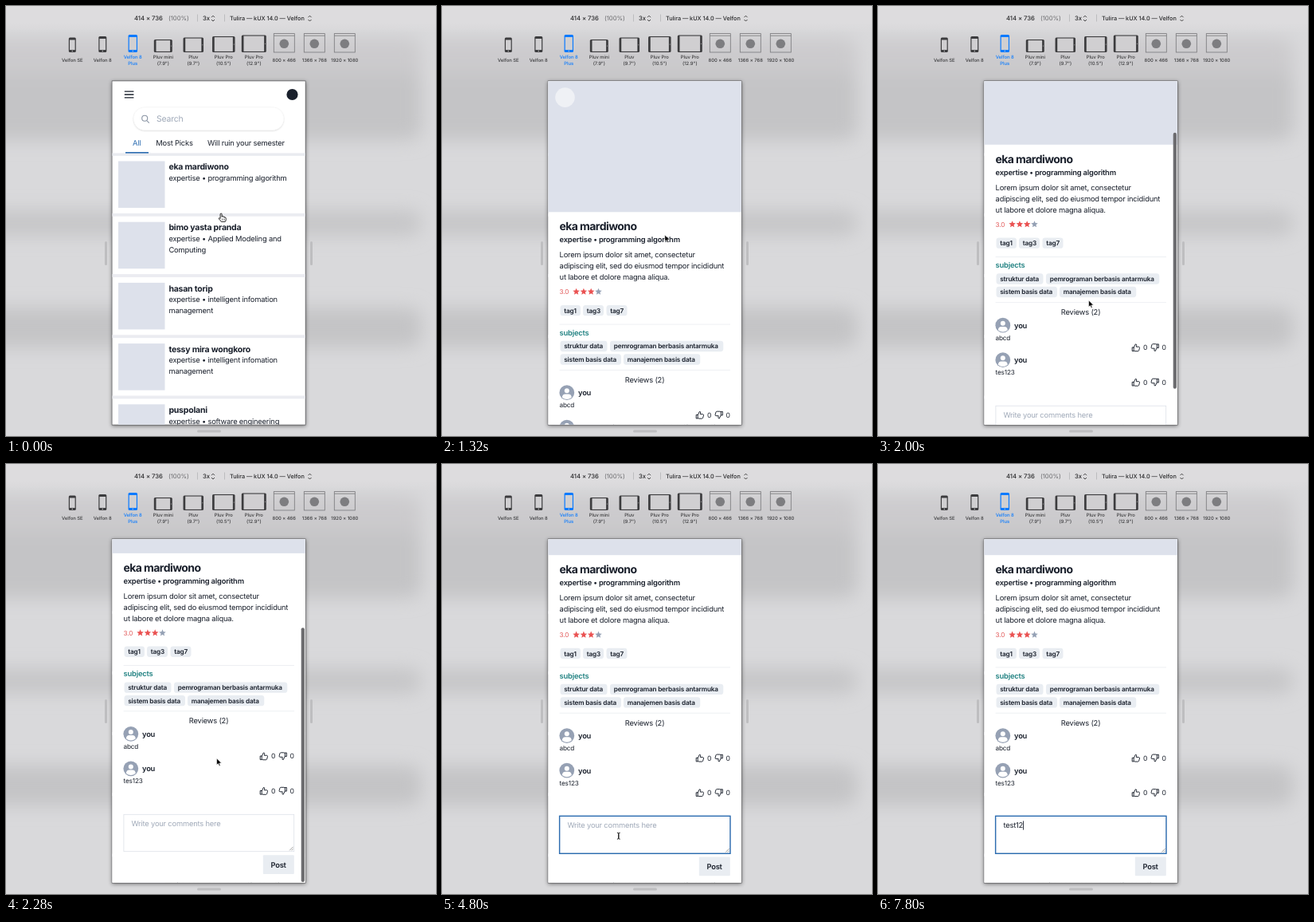
Write an HTML page that moves like this. It is 540x539 px and loops after 8 s.

```html
<!DOCTYPE html>
<html lang="en">
<head>
<meta charset="utf-8">
<title>Lecturer reviews</title>
<style>
  html, body { margin: 0; width: 100%; height: 100%; overflow: hidden; background: #d9d9db; }
  svg { display: block; width: 540px; height: 539px; }
  text { font-family: Inter, Roboto, sans-serif; letter-spacing: -.021em; white-space: pre; text-rendering: geometricPrecision; }
  .bar { letter-spacing: -.005em; }
</style>
</head>
<body>
<svg id="stage" viewBox="0 0 540 539" xmlns="http://www.w3.org/2000/svg"></svg>
<script>
const LOOP = 8000, STEP = 40, MAX_SCROLL = 144.1;
const INK = '#1a202c', CHIP = '#e9edf2', PHOTO = '#dde1eb', BLUE = '#2b6cb0', MUTED = '#a0aab9';

// Drawing helpers: each returns SVG markup
const text = (x, y, s, { size = 9.36, weight = 400, fill = INK, more = '' } = {}) =>
  `<text x="${x}" y="${y}" font-size="${size}" font-weight="${weight}" fill="${fill}" ${more}>${s}</text>`;
const rect = (x, y, w, h, fill, more = '') =>
  `<rect x="${x}" y="${y}" width="${w}" height="${h}" fill="${fill}" ${more}/>`;
const circle = (x, y, r, fill) => `<circle cx="${x}" cy="${y}" r="${r}" fill="${fill}"/>`;
const path = (d, stroke, width = 1, more = '') =>
  `<path d="${d}" fill="none" stroke="${stroke}" stroke-width="${width}" ${more}/>`;
const group = (id, body, more = '') => `<g id="${id}" ${more}>${body}</g>`;

function backdrop() {
  const round = 'rx="16"';
  const bands = rect(-40, 40, 562, 80, '#cccbcd', round) + rect(-40, 84, 562, 84, '#c4c4c6', round) +
    rect(-40, 256, 562, 32, '#c6c6c8', round) + rect(-40, 378, 562, 50, '#c4c4c6', round);
  return rect(0, 0, 540, 539, '#d9d9db') + `<g filter="url(#soft)">${bands}</g>` +
    rect(0, 0, 540, 34, 'url(#topFade)') +
    rect(124, 295, 3, 30, '#bebec0', 'rx="1.5"') + rect(382, 295, 3, 30, '#bebec0', 'rx="1.5"') +
    rect(240, 531.5, 30, 3, '#bebec0', 'rx="1.5"');
}

function toolbar() {
  const bar = { size: 7.7, weight: 500, fill: '#29292b', more: 'class="bar"' };
  const chevrons = x => path(`M${x - 2} 14.2l2-2 2 2M${x - 2} 17l2 2 2-2`, '#333', .9);
  let out = text(161, 18.2, '414 × 736', bar) +
    text(204, 18.2, '(100%)', { ...bar, weight: 400, fill: '#6b6b6e' }) +
    text(247, 18.2, '3x', bar) + chevrons(260) +
    text(281, 18.2, 'Tulira — kUX 14.0 — Velfon', { ...bar, size: 7.3 }) + chevrons(381.5) +
    rect(240, 10.5, .8, 9, '#b4b4b6') + rect(274, 10.5, .8, 9, '#b4b4b6');

  const devices = [
    ['phone', 9, 18.5, 'Velfon SE'], ['phone', 10, 20, 'Velfon 8'],
    ['phone', 11.5, 22, 'Velfon 8', 'Plus'],
    ['tablet', 23, 16, 'Pluv mini', '(7.9")'], ['tablet', 25.5, 18.5, 'Pluv', '(9.7")'],
    ['tablet', 28.5, 20, 'Pluv Pro', '(10.5")'], ['tablet', 31, 21.5, 'Pluv Pro', '(12.9")'],
    ['window', 26, 23.4, '800 × 466'], ['window', 26, 23.4, '1366 × 768'], ['window', 26, 23.4, '1920 × 1080']
  ];
  devices.forEach(([kind, w, h, ...lines], i) => {
    const cx = 83.3 + i * 38, x = cx - w / 2, y = 58 - h;
    const active = i === 2, color = active ? '#0a7aff' : '#3c3c3e';
    if (kind === 'window') {
      out += rect(x, y, w, h, 'none', 'stroke="#77777a" stroke-width=".8"') +
        rect(x, y + 2.2, w, .8, '#77777a') + circle(cx, 47.3, 5.8, '#7d7d80');
    } else {
      const side = kind === 'tablet';
      out += rect(x, y, w, h, color, 'rx="1.6"') +
        (side ? rect(x + 2.7, y + 1.1, w - 5.4, h - 2.2, '#d0cfd1')
              : rect(x + 1.2, y + 3, w - 2.4, h - 6, '#d0cfd1')) +
        (side ? circle(x + w - 1.3, y + h / 2, .6, '#aaa') : circle(cx, 56.5, .8, '#c4c4c6'));
    }
    const top = lines.length > 1 ? 66.3 : 70.3;
    lines.forEach((s, n) => {
      out += text(cx, top + n * 7.8, s, {
        size: 5.9, weight: 500, fill: active ? '#0a7aff' : '#3a3a3c', more: 'class="bar" text-anchor="middle"'
      });
    });
  });
  return out;
}

function listPage() {
  const rows = [
    ['eka mardiwono', 'programming algorithm'],
    ['bimo yasta pranda', 'Applied Modeling and', 'Computing'],
    ['hasan torip', 'intelligent infomation', 'management'],
    ['tessy mira wongkoro', 'intelligent infomation', 'management'],
    ['puspolani', 'software engineering']
  ];
  let out = rect(133, 94, 243, 431, '#fff') +
    path('M148.8 107.2h11.6M148.8 111h11.6M148.8 114.8h11.6', INK, 1.3) +
    circle(359.5, 111, 7.1, INK) +
    rect(160.5, 127.5, 188, 28, '#fff', 'rx="14" filter="url(#pill)"') +
    path('M177 143.8l2.8 2.8', '#8b95a5', 1.1) +
    '<circle cx="174.2" cy="140.8" r="3.5" fill="none" stroke="#8b95a5" stroke-width="1.1"/>' +
    text(189, 145, 'Search', { size: 10.5, fill: MUTED }) +
    text(159, 175, 'All', { fill: BLUE }) + text(188.3, 175, 'Most Picks') +
    text(253, 175, 'Will ruin your semester') +
    rect(133, 184.4, 243, 3.4, '#e9ebf0') + rect(150, 183, 29, 1.6, BLUE);
  rows.forEach(([name, topic, rest], i) => {
    const y = 194.5 + i * 76.2;
    out += rect(141, y, 58.5, 58.5, PHOTO) +
      text(204.4, y + 10.6, name, { size: 10.5, weight: 700 }) +
      text(204.4, y + 24.2, 'expertise • ' + topic) +
      (rest ? text(204.4, y + 38.2, rest) : '') +
      rect(133, y + 65.4, 243, 3.8, '#ebecf1');
  });
  return out;
}

function review(y, comment) {
  const up = 'M-4.8 -.3h2v4.6h-2zM-2.8 .2L-.7 -4.3q1.6 -.2 1.4 1.6l-.3 1.7h3.2q1.1 .2 .9 1.4l-.9 3.3q-.3 .8 -1.2 .8h-3.5l-1.7 -.5';
  const thumb = (x, turn) =>
    path(up, INK, .95, `stroke-linejoin="round" transform="translate(${x} ${y + 28}) rotate(${turn})"`);
  return circle(156.8, y, 9.4, '#96a1b4') + circle(156.8, y - 2.4, 3, '#fff') +
    `<path d="M150.8 ${y + 6}q.4 -4.3 4 -4.3h4q3.6 0 4 4.3q-6 4.4 -12 0z" fill="#fff"/>` +
    text(171, y + 3.5, 'you', { weight: 600 }) + text(147.6, y + 18.7, comment, { size: 8.19 }) +
    thumb(324, 0) + text(333, y + 31.2, '0', { size: 8.6 }) +
    thumb(347.6, 180) + text(356.6, y + 31.2, '0', { size: 8.6 });
}

function star(cx, cy, r, fill) {
  const pts = Array.from({ length: 10 }, (_, i) => {
    const a = i * Math.PI / 5, d = i % 2 ? r * .45 : r;
    return `${(cx + d * Math.sin(a)).toFixed(2)},${(cy - d * Math.cos(a)).toFixed(2)}`;
  });
  return `<polygon points="${pts.join(' ')}" fill="${fill}"/>`;
}

// Laid out as seen when scrolled to the end
function detailPage() {
  const chip = (x, y, w, s) => rect(x, y, w, 13.4, CHIP, 'rx="3.4"') +
    text(x + 4.8, y + 9.7, s, { size: 8.19, weight: 600 });
  const lorem = ['Lorem ipsum dolor sit amet, consectetur',
    'adipiscing elit, sed do eiusmod tempor incididunt', 'ut labore et dolore magna aliqua.'];
  return rect(133, -60, 243, 174.2, PHOTO) + circle(154.5, -29.5, 12.3, '#eff1f5') +
    text(147.4, 137.4, 'eka mardiwono', { size: 14, weight: 700, more: 'style="letter-spacing:-.04em"' }) +
    text(147.6, 152.4, 'expertise • programming algorithm', { weight: 600 }) +
    lorem.map((s, i) => text(147.6, 171.2 + i * 14.1, s)).join('') +
    text(147.6, 217, '3.0', { size: 8.19, fill: '#e25a5a' }) +
    [0, 1, 2, 3].map(i => star(168.6 + i * 9.3, 214.1, 4.5, i < 3 ? '#ea5252' : '#94a0b4')).join('') +
    chip(148.5, 230.8, 25.5, 'tag1') + chip(177, 230.8, 26, 'tag3') + chip(206.5, 230.8, 26, 'tag7') +
    rect(147.6, 254.6, 214.4, .7, '#e6e9ee') +
    text(147.6, 268.6, 'subjects', { weight: 600, fill: '#1f8080' }) +
    chip(148.5, 275.7, 59, 'struktur data') + chip(211, 275.7, 142.3, 'pemrograman berbasis antarmuka') +
    chip(148.5, 292.2, 76.5, 'sistem basis data') + chip(228, 292.2, 96.3, 'manajemen basis data') +
    rect(147.6, 311.8, 214.4, .7, '#e6e9ee') +
    text(254.6, 327.6, 'Reviews (2)', { more: 'text-anchor="middle"' }) +
    review(340.6, 'abcd') + review(384.1, 'tes123') +
    rect(147.9, 441.6, 213.8, 46.4, '#fff', 'stroke="#dde1e8" stroke-width=".8"') +
    rect(147.6, 441.3, 214.4, 47, 'none', `id="ring" stroke="${BLUE}" stroke-width="1.4"`) +
    path('M356.2 486.6l4.4 -4.4M358.8 486.6l1.8 -1.8', '#777', .7) +
    text(157.4, 456.4, 'Write your comments here', { fill: MUTED, more: 'id="hint"' }) +
    text(157.4, 456.4, '', { more: 'id="typed"' }) +
    rect(0, 447.4, .9, 11.2, INK, 'id="caret"') +
    rect(322.8, 492.6, 39, 23.6, CHIP, 'rx="1"') + text(332.4, 507.9, 'Post', { weight: 600 });
}

function cursors() {
  const palm = 'M-1 1q0 -1 1 -1t1 1v3l.3 -.6q1.5 -.3 1.7 .7q1.5 -.2 1.7 .8q1.5 0 1.5 1.4v1.2q0 1.5 -1 2.9h-5q-.8 -1.4 -2.9 -3.6q-.4 -1.2 .9 -1.1l.8 .8z';
  const beam = 'M-1.9 -4q1.9 0 1.9 1v6q0 1 -1.9 1M1.9 -4q-1.9 0 -1.9 1v6q0 1 1.9 1';
  return group('hand', `<path d="${palm}" fill="#fff" stroke="#111" stroke-width=".9"/>` +
      path('M1.2 6.6v2M2.8 6.6v2M4.4 6.6v2M1.1 4v1.2M3 4.2v1.2M4.7 5v.9', '#111', .5)) +
    '<path id="arrow" d="M0 0v8.3l1.9 -1.8 1.3 3 1.4 -.6 -1.3 -2.9h2.7z" fill="#000" stroke="#fff" stroke-width=".6"/>' +
    path(beam, '#111', .95, 'id="beam"');
}

document.getElementById('stage').innerHTML = `
  <defs>
    <clipPath id="screen"><rect x="133.4" y="94.2" width="242.4" height="430.6"/></clipPath>
    <linearGradient id="topFade" x2="0" y2="1">
      <stop stop-color="#dddcde"/><stop offset=".6" stop-color="#dddcde"/><stop offset="1" stop-color="#dddcde" stop-opacity="0"/>
    </linearGradient>
    <filter id="soft" x="-10%" y="-10%" width="120%" height="120%"><feGaussianBlur stdDeviation="11"/></filter>
    <filter id="lift" x="-10%" y="-10%" width="120%" height="120%"><feGaussianBlur stdDeviation="2.6"/></filter>
    <filter id="pill" x="-10%" y="-30%" width="120%" height="170%">
      <feDropShadow dx="0" dy=".6" stdDeviation="1" flood-color="#000" flood-opacity=".2"/>
    </filter>
  </defs>` +
  backdrop() + toolbar() +
  rect(133, 95, 243.4, 431.4, '#000', 'opacity=".5" filter="url(#lift)"') +
  rect(132.8, 93.6, 243.6, 431.8, '#4c4c4f') +
  group('view', listPage() +
    group('detail', rect(133, 94, 243, 431, '#fff') + group('content', detailPage()) +
      rect(370.7, 94, 4.2, 320, '#6c6c6f', 'id="thumb" rx="2.1"')), 'clip-path="url(#screen)"') +
  group('pointer', cursors());

// Motion tables: [time, value...]
const slide = [[760, -243], [800, -190], [840, -122], [880, -64.3], [920, -35], [1079, -35], [1080, -5], [1120, -1.5], [1160, 0]];
const scroll = [[1720, 0], [1800, 7], [1880, 25.2], [1960, 66], [2040, 103], [2120, 128], [2200, 141], [2280, 146.4], [2400, 146.7], [2540, 145.2], [2680, MAX_SCROLL]];
const barFade = [[1720, 0], [1800, 1], [3300, 1], [3560, 0]];
const move = [[40, 270.1, 260], [240, 274, 252], [440, 283, 234], [640, 289, 222], [760, 289.8, 219.5],
  [1080, 289.8, 219.5], [1240, 285, 255], [1440, 272, 335], [1600, 264.6, 369], [2760, 264.6, 369],
  [2880, 264.2, 420], [3040, 263.2, 488.5], [3320, 263.2, 488.5], [3480, 242, 475], [3640, 225, 467], [3720, 221.8, 466.2]];
const ring = [[4000, 0], [4200, 1]];
const blink = [[4000, 0], [4040, 1], [4480, 1], [4800, 0], [5000, 0], [5200, 1], [5480, 1], [5800, 0], [6000, 0], [6200, 1],
  [6640, 1], [6800, 0], [7080, 0], [7200, 1]];
const keyTimes = [6400, 6480, 6560, 6640, 7520, 7720];
const typedWord = 'test12';

function at(keys, t) {
  const i = keys.findIndex(k => k[0] > t);
  if (i < 0) return keys[keys.length - 1].slice(1);
  if (i === 0) return keys[0].slice(1);
  const [a, b] = [keys[i - 1], keys[i]], p = (t - a[0]) / (b[0] - a[0]);
  return a.slice(1).map((v, n) => v + (b[n + 1] - v) * p);
}

const $ = id => document.getElementById(id);
const shift = (id, x, y) => $(id).setAttribute('transform', `translate(${x} ${y})`);
const fade = (id, v) => $(id).setAttribute('opacity', v);

function render(t) {
  const [top] = at(scroll, t);
  shift('detail', at(slide, t)[0], 0);
  shift('content', 0, MAX_SCROLL - top);
  const ratio = 430.8 / (430.8 + MAX_SCROLL), barTop = 95.5 + top * ratio;
  $('thumb').setAttribute('y', barTop);
  $('thumb').setAttribute('height', Math.min(321, 524 - barTop));
  fade('thumb', at(barFade, t)[0]);

  shift('pointer', ...at(move, t));
  const shape = t < 1080 ? 'hand' : t < 3480 ? 'arrow' : t < 6400 ? 'beam' : '';
  ['hand', 'arrow', 'beam'].forEach(id => fade(id, id === shape ? 1 : 0));

  const count = keyTimes.filter(k => k <= t).length;
  $('typed').textContent = typedWord.slice(0, count);
  fade('hint', count ? 0 : 1);
  fade('ring', at(ring, t)[0]);
  $('caret').setAttribute('x', 157.4 + (count ? $('typed').getComputedTextLength() : 0));
  fade('caret', at(blink, t)[0]);
}

const start = performance.now();
function tick() {
  const t = (performance.now() - start) % LOOP;
  render(Math.floor(t / STEP) * STEP);
  requestAnimationFrame(tick);
}
tick();
</script>
</body>
</html>
```
